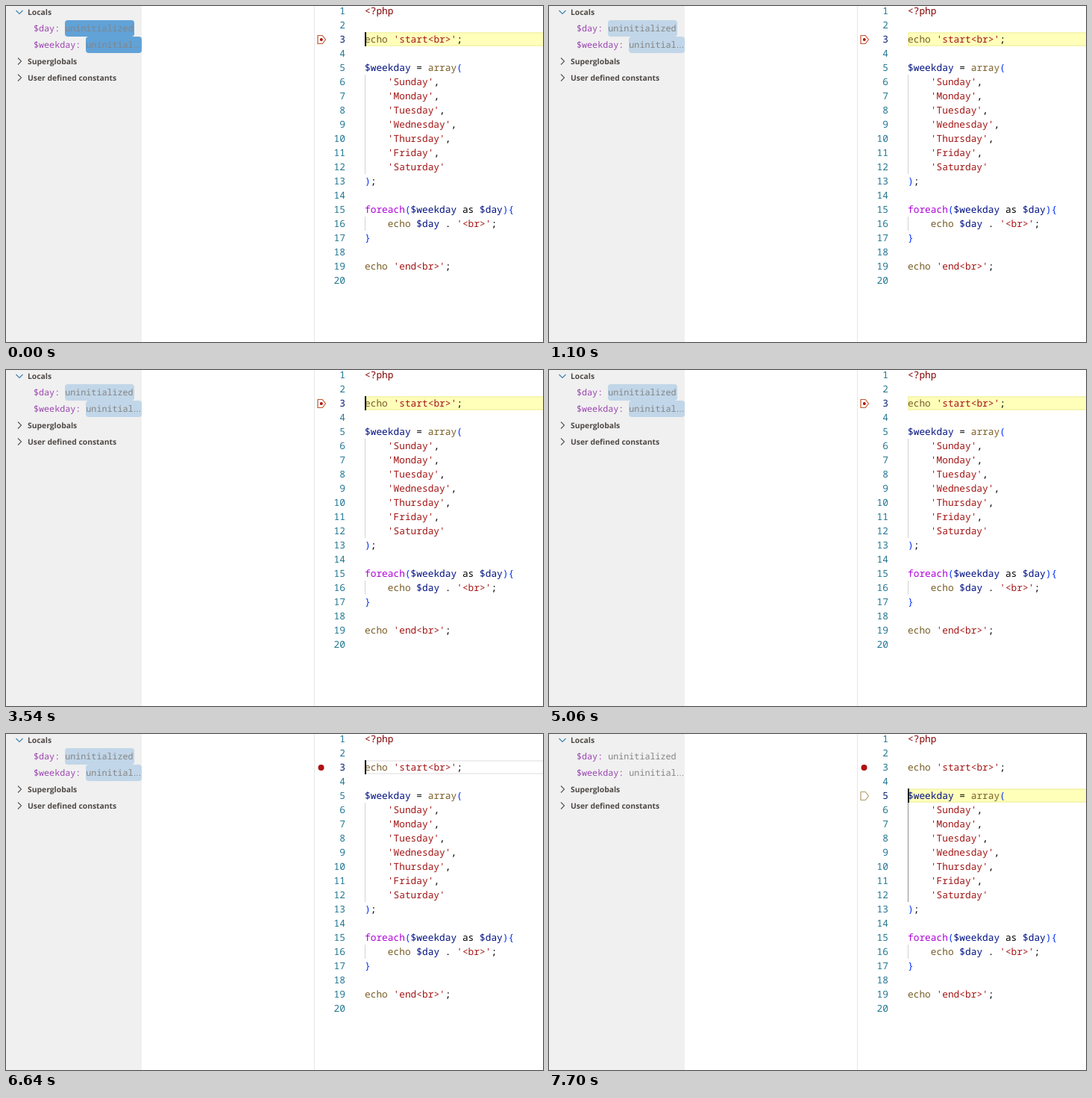
Write an HTML page that moves like this. It is 720 px wide and 450 px high and loops after 8000 ms.

```html
<!DOCTYPE html>
<html lang="en">
<head>
<meta charset="utf-8">
<style>
html, body { margin: 0; width: 100%; height: 100%; overflow: hidden; background: #fff; }
svg { display: block; }
text { white-space: pre; text-rendering: geometricPrecision; }
.code { font: 12.83px "Noto Sans Mono", monospace; }
.value { font: 11.72px "Noto Sans Mono", monospace; fill: #848484; }
.value .name { fill: #9b46b0; }
.value .dots { font: 11px "Liberation Sans", sans-serif; }
.label { font: bold 10.35px "Open Sans", sans-serif; fill: #504a46; }
.chevron { fill: none; stroke: #555; stroke-width: 1.1; }
</style>
</head>
<body>
<svg width="720" height="450" viewBox="0 0 720 450">
  <rect width="182" height="450" fill="#f0f0f0"/>
  <rect x="413" width="1" height="450" fill="#e7e7e7"/>

  <g id="badges" fill="#569cd6">
    <rect x="79" y="19" width="93" height="22" rx="4"/>
    <rect x="107" y="41" width="75" height="22" rx="4"/>
  </g>
  <path class="chevron" style="stroke:#3b7fae" d="M13.5 6l4.5 4.5L22.5 6"/>
  <path class="chevron" d="M16 69.5l4.5 4.5L16 78.5M16 91.5l4.5 4.5L16 100.5"/>
  <text class="label" x="29" y="12">Locals</text>
  <text class="label" x="29" y="78">Superglobals</text>
  <text class="label" x="29" y="100">User defined constants</text>
  <text class="value" x="37" y="34"><tspan class="name">$day: </tspan>uninitialized</text>
  <text class="value" x="37" y="56"><tspan class="name">$weekday: </tspan>uninitial<tspan class="dots">…</tspan></text>

  <g id="band">
    <rect id="fill" x="481" width="240" height="19" fill="#ffffba"/>
    <rect id="border" x="482" y="1" width="242" height="17" fill="none" stroke-width="2"/>
  </g>
  <rect id="guide" x="481" y="92" width="1" height="133"/>
  <rect x="481" y="282" width="1" height="19" fill="#d3d3d3"/>
  <g id="editor"></g>
  <path id="arrow" d="M418 39.5h6.2l4.3 5.5-4.3 5.5H418z" fill="none" stroke-width="1.2" stroke-linejoin="round"/>
  <circle id="dot" cy="45" fill="#b01011"/>
  <rect id="cursor" x="481" width="2" height="19"/>
</svg>
<script>
const LOOP = 8000, CONTINUE = 6640, STOP = 6710;
const source = `<?php

echo 'start<br>';

$weekday = array(
    'Sunday',
    'Monday',
    'Tuesday',
    'Wednesday',
    'Thursday',
    'Friday',
    'Saturday'
);

foreach($weekday as $day){
    echo $day . '<br>';
}

echo 'end<br>';
`;
const syntax = [
  [/^'/, '#a31515'], [/^\$/, '#001080'], [/^<\?/, '#800000'],
  [/^foreach/, '#af00db'], [/^(echo|array)/, '#795e26'], [/^[(){}]/, '#0431fa']
];
const $ = id => document.getElementById(id);
const set = (el, attrs) => { for (const k in attrs) el.setAttribute(k, attrs[k]); };
const lineTop = n => 19 * n - 22;

function add(parent, tag, attrs, content = '') {
  const el = document.createElementNS('http://www.w3.org/2000/svg', tag);
  set(el, attrs);
  el.textContent = content;
  return parent.appendChild(el);
}

const numbers = source.split('\n').map((line, i) => {
  const y = lineTop(i + 1) + 14;
  const text = add($('editor'), 'text', { class: 'code', x: 481, y });
  for (const token of line.match(/'[^']*'|\$\w+|<\?php|\w+|[(){}]|\s+|./g) || []) {
    const rule = syntax.find(([pattern]) => pattern.test(token));
    add(text, 'tspan', { fill: rule ? rule[1] : '#000' }, token);
  }
  return add($('editor'), 'text', { class: 'code', x: 455, y, 'text-anchor': 'end' }, i + 1);
});

// The CSS "ease" curve, solved by bisection.
function ease(x) {
  if (x <= 0) return 0;
  if (x >= 1) return 1;
  const bezier = (a, b, u) => 3 * a * u * (1 - u) ** 2 + 3 * b * u * u * (1 - u) + u ** 3;
  let lo = 0, hi = 1;
  for (let i = 0; i < 20; i++) {
    const mid = (lo + hi) / 2;
    if (bezier(.25, .25, mid) < x) lo = mid; else hi = mid;
  }
  return bezier(.1, 1, lo);
}

function cursorVisible(t) {
  if (t >= 6510) return t < 7170 || t >= 7700;
  return (t - 1100 + 1980) % 990 >= 460;
}

function draw(t) {
  const stopped = t >= STOP, moved = t >= CONTINUE, running = moved && !stopped;
  const active = stopped ? 5 : 3, top = lineTop(active);
  const fadeTime = t < 900 ? Math.floor((t - 1) / 69) * 69 + 1 : t;

  set($('badges'), { opacity: t >= 7100 ? 0 : 1 - .7 * ease((Math.max(0, fadeTime) + 100) / 950) });
  set($('band'), { transform: `translate(0 ${top})` });
  set($('fill'), { opacity: running ? 0 : 1 });
  set($('border'), { stroke: running ? '#eee' : '#f6f6b1' });
  set($('guide'), { fill: stopped ? '#939393' : '#d3d3d3' });
  set($('arrow'), {
    transform: `translate(0 ${top - 35})`,
    stroke: stopped ? '#b59a6a' : '#c4532b',
    opacity: running ? 0 : 1
  });
  set($('dot'), { cx: moved ? 422.5 : 422.8, r: moved ? 4 : 2 });
  set($('cursor'), { y: top, opacity: cursorVisible(t) ? 1 : 0 });
  numbers.forEach((el, i) => set(el, { fill: i + 1 === active ? '#0b216f' : '#237893' }));
}

const start = performance.now();
function tick() {
  draw((performance.now() - start) % LOOP);
  requestAnimationFrame(tick);
}
tick();
</script>
</body>
</html>
```
